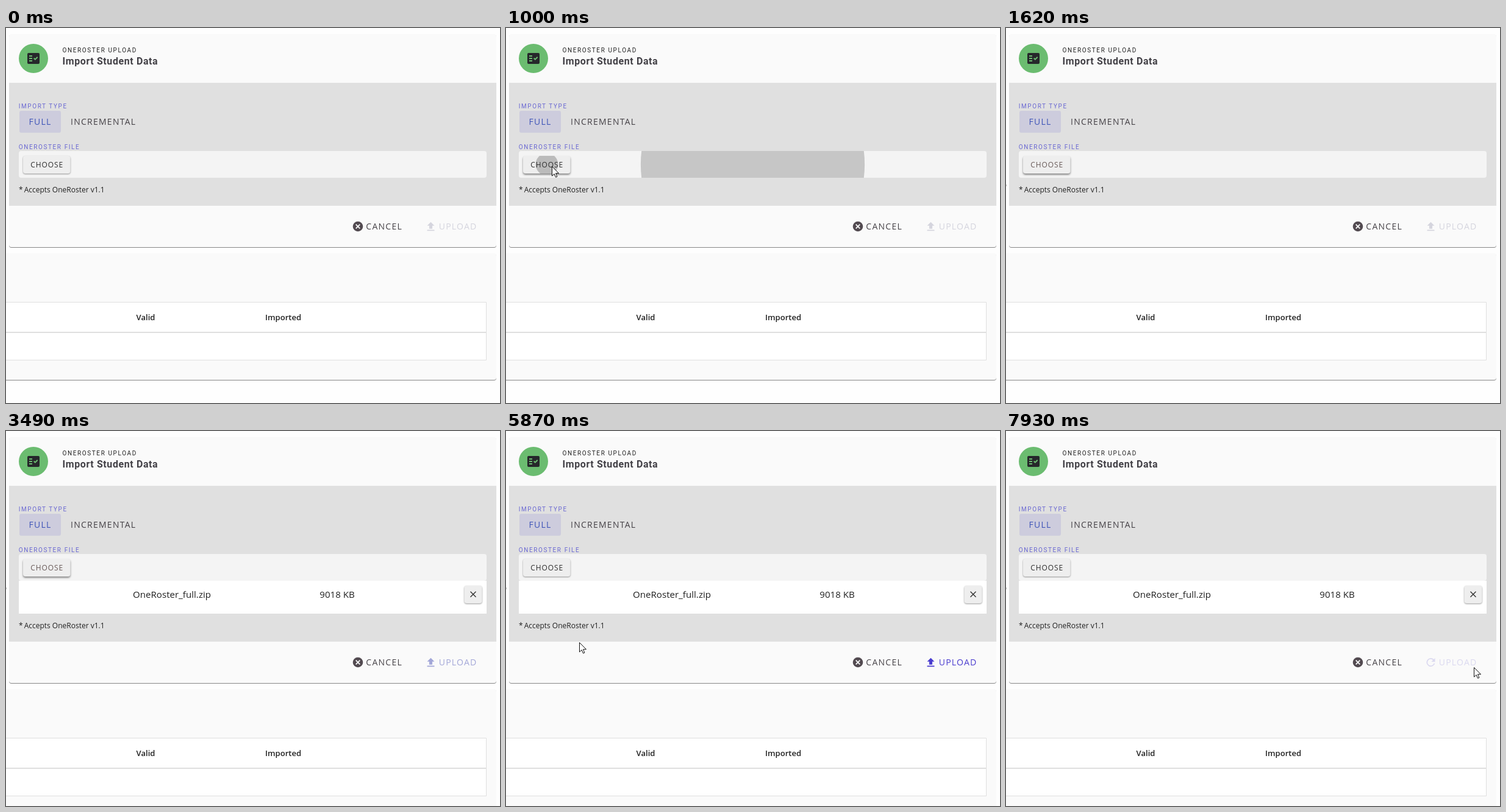
An HTML page that plays this animation: 810 px wide and 616 px high, repeating every 8000 ms.

```html
<!DOCTYPE html>
<html lang="en">
<head>
<meta charset="utf-8">
<title>Import Student Data</title>
<style>
  html, body { margin: 0; width: 100%; height: 100%; overflow: hidden; background: #fefefe; }
  svg { display: block; width: 810px; height: 616px; font-family: "Open Sans", "Noto Sans", sans-serif; }
  text { fill: #212121; white-space: pre; }
  .card { fill: #fafafa; filter: drop-shadow(0 1px .7px #0007); }
  .button { fill: #eee; filter: drop-shadow(0 1px 1px #0006); }
  .raised { filter: drop-shadow(0 2px 1.4px #0007); }
  .overline { font: 10px Roboto, sans-serif; letter-spacing: 1.6px; }
  .title { font: bold 16px Roboto, sans-serif; letter-spacing: .6px; fill: #424046; }
  .label { fill: #6a68d2; }
  .action { font-size: 14px; font-weight: 500; letter-spacing: 1.25px; fill: #454146; }
  .choose { font-size: 12px; font-weight: 500; letter-spacing: .9px; }
  .note { font-size: 12px; }
  .file { font-size: 15.1px; }
  .head { font-size: 13.1px; font-weight: 600; }
  #upload text { fill: inherit; }
</style>
</head>
<body>
<svg viewBox="0 0 810 616">
  <clipPath id="barClip"><rect x="21" y="202" width="767" height="44" rx="4"/></clipPath>
  <clipPath id="buttonClip"><rect x="28" y="210" width="77.5" height="29" rx="4"/></clipPath>

  <rect id="card" class="card" x="5" y="10" width="799" height="350" rx="4"/>
  <circle cx="45" cy="50" r="24" fill="#6bbc70"/>
  <path transform="translate(33 38)" fill="#26282b" fill-rule="evenodd" d="M4 3H20a2 2 0 0 1 2 2V19a2 2 0 0 1-2 2H4a2 2 0 0 1-2-2V5a2 2 0 0 1 2-2zM5 7v2h5V7zM5 11v2h5v-2zM5 15v2h5v-2zM14.8 15l4.6-4.6L18 9l-3.2 3.2-1.4-1.4L12 12.2z"/>
  <text class="overline" x="92.5" y="40">ONEROSTER UPLOAD</text>
  <text class="title" x="92.5" y="60">Import Student Data</text>

  <rect id="form" x="5" y="90" width="799" height="202" fill="#e0e0e0"/>
  <text class="overline label" x="20.7" y="132">IMPORT TYPE</text>
  <rect x="22" y="136" width="68" height="36" rx="3" fill="#cdccdd"/>
  <text class="action" x="37.5" y="159" style="fill:#3f55b8">FULL</text>
  <text class="action" x="106" y="159">INCREMENTAL</text>
  <text class="overline label" x="20.7" y="199">ONEROSTER FILE</text>

  <rect x="21" y="202" width="767" height="44" rx="4" fill="#f4f4f4"/>
  <rect id="choose" class="button" x="28" y="210" width="77.5" height="29" rx="4"/>
  <g clip-path="url(#buttonClip)"><circle id="buttonRipple" cx="67" cy="224"/></g>
  <text id="chooseText" class="choose" x="40.3" y="229">CHOOSE</text>
  <g clip-path="url(#barClip)"><circle id="barRipple" cx="404.5" cy="224"/></g>

  <g id="fileRow">
    <rect x="21" y="246" width="767" height="54" fill="#fff"/>
    <text class="file" x="208" y="274">OneRoster_full.zip</text>
    <text class="file" x="514.3" y="274">9018 KB</text>
    <rect class="button" x="751.5" y="254" width="29" height="29" rx="4"/>
    <path d="M761.5 263.7l9 9m0-9l-9 9" stroke="#333" stroke-width="1.4"/>
  </g>

  <g id="lower">
    <text class="note" x="21" y="270">*</text>
    <text class="note" x="29.7" y="270">Accepts OneRoster v1.1</text>
    <circle cx="577" cy="326" r="8.3" fill="#524a50"/>
    <path d="M573.7 322.7l6.6 6.6m0-6.6l-6.6 6.6" stroke="#fafafa" stroke-width="1.8"/>
    <text class="action" x="590.3" y="331">CANCEL</text>
    <g id="upload">
      <path id="arrow" transform="translate(696.5 326) scale(.85) translate(-12 -11.5)" d="M9 16V10H5l7-7 7 7H15v6zM5 20V18H19v2z"/>
      <path id="spinner" d="M17.65 6.35A8 8 0 1 0 19.73 14H17.65A6 6 0 1 1 16.22 7.78L13 11h7V4z"/>
      <text class="action" x="709.7" y="331">UPLOAD</text>
    </g>
    <rect class="card" x="-20" y="370" width="824" height="208" rx="4"/>
    <path d="M-5 450.5H787.5V545.5H-5" fill="#fff" stroke="#dfdfdf"/>
    <path d="M-5 500H787" stroke="#dfdfdf" stroke-width="2"/>
    <text class="head" x="213.5" y="480">Valid</text>
    <text class="head" x="425" y="480">Imported</text>
  </g>

  <rect id="edgeMark" y="257" width="1" height="3" fill="#bbb"/>
  <path id="cursor" d="M.5 .5V16l3.6-3.4 2.5 5.6 2.3-1-2.4-5.5h5z" fill="#fff" stroke="#111"/>
</svg>
<script>
const LOOP = 8000;
const $ = id => document.getElementById(id);
const clamp = v => Math.max(0, Math.min(1, v));
const span = (t, from, to) => clamp((t - from) / (to - from));
const smooth = p => p * p * (3 - 2 * p);
const show = (id, on) => $(id).style.display = on ? "" : "none";
const mix = (a, b, p) => `rgb(${a.map((v, i) => v + (b[i] - v) * p)})`;

const DISABLED = [213, 213, 222], HALF = [163, 167, 216], ACTIVE = [74, 60, 207], BUSY = [219, 217, 240];

// Each stop: time, x, y of the pointer tip
const paths = [
  [[240, 180, 461], [590, 78, 222], [860, 78, 222], [1140, 72, 232], [1480, -14, 258]],
  [[5870, 120, 347], [6430, 767, 393], [7090, 767, 393], [7160, 767, 388], [LOOP, 767, 388]]
];

function pointer(t) {
  const path = paths.find(p => t >= p[0][0] && t < p.at(-1)[0]);
  if (!path) return null;
  const i = path.findIndex(stop => stop[0] > t);
  const [t0, x0, y0] = path[i - 1], [t1, x1, y1] = path[i];
  const p = smooth(span(t, t0, t1));
  return [x0 + (x1 - x0) * p, y0 + (y1 - y0) * p];
}

function ripple(id, radius, t, strength) {
  const on = t >= 850 && t < 1310;
  show(id, on);
  if (!on) return;
  $(id).setAttribute("r", radius * (t - 850) / 315);
  $(id).setAttribute("fill-opacity", strength * (1 - span(t, 850, 1310)));
}

function uploadColor(t) {
  if (t < 3490) return mix(DISABLED, DISABLED, 0);
  if (t < 7300) return mix(HALF, ACTIVE, span(t, 3510, 3620));
  return mix(ACTIVE, BUSY, span(t, 7300, 7450));
}

function draw(t) {
  const chosen = t >= 3490, busy = t >= 7300, shift = chosen ? 54 : 0;
  $("card").setAttribute("height", 350 + shift);
  $("form").setAttribute("height", 202 + shift);
  $("lower").setAttribute("transform", `translate(0 ${shift})`);
  show("fileRow", chosen);
  show("edgeMark", t >= 1480);

  $("choose").classList.toggle("raised", t >= 520 && t < 3540);
  $("chooseText").style.fill = t >= 1620 && t < 3540 ? "#6a5c5a" : "#303030";
  ripple("buttonRipple", 38.5, t, .32);
  ripple("barRipple", 383, t, .28);

  $("upload").style.fill = uploadColor(t);
  show("arrow", !busy);
  show("spinner", busy);
  const angle = (t - 7930) * .18;
  $("spinner").setAttribute("transform", `translate(696.5 326) rotate(${angle}) scale(.88) translate(-12 -12)`);

  const tip = pointer(t);
  show("cursor", tip);
  if (tip) $("cursor").setAttribute("transform", `translate(${tip.map(Math.round)})`);
}

function frame() {
  draw(performance.now() % LOOP);
  requestAnimationFrame(frame);
}
frame();
</script>
</body>
</html>
```
